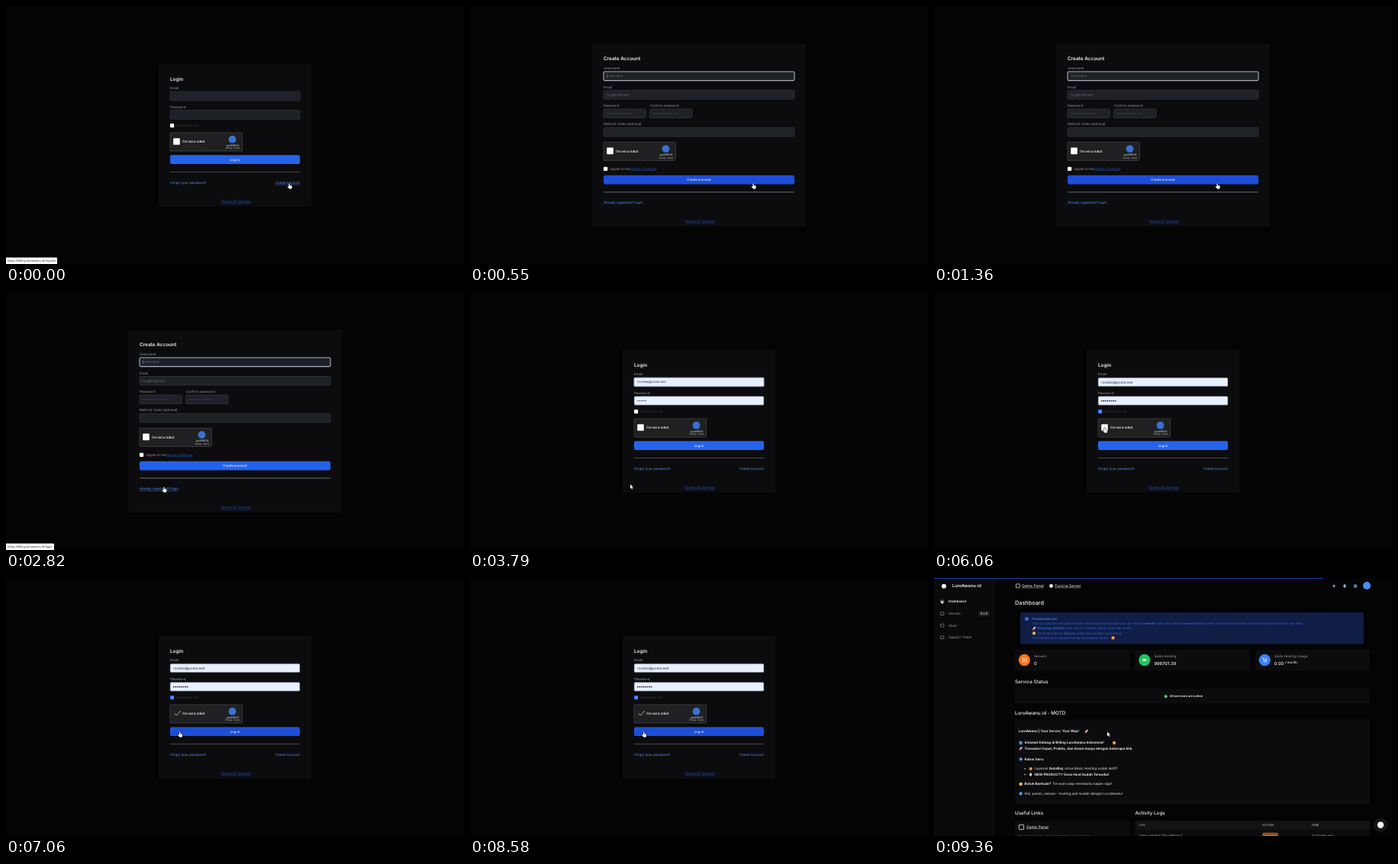
These frames come from a looping animation (600 px wide and 338 px high, 9390 ms). An HTML page with a canvas:

```html
<!DOCTYPE html>
<html lang="id">
<head>
<meta charset="utf-8">
<title>Login flow</title>
<style>
html, body { margin: 0; width: 100%; height: 100%; overflow: hidden; background: #040405; }
canvas { display: block; width: 600px; height: 338px; }
</style>
</head>
<body>
<canvas id="stage"></canvas>
<script>
const LOOP = 9390;
// Moments (ms) at which the page reacts
const AT = { register: 500, login: 3450, remember: 5000, verify: 6100, verified: 6550, dashboard: 8950 };
// Pointer stops: time, x, y
const STOPS = [
  [0, 370.5, 232.5], [1520, 370.5, 232.5], [2350, 206.3, 255.5], [3500, 206.3, 255.5],
  [3680, 210, 252], [3860, 210, 252], [4700, 217.3, 157.5], [5700, 217.3, 157.5],
  [6020, 223, 177.5], [6650, 223, 177.5], [7000, 227, 201.5], [LOOP, 227, 201.5]
];
const BRAND = 'LuroAwanu', CHAT = 'Tuvicra';
const BLUE = '#2563eb', HOVER = '#1d4ed8', LINK = '#5595f5', LABEL = '#9a9ca3', WHITE = '#f4f4f5';
const ARROW = new Path2D('M0 0V5.6L1.3 4.4L2.2 6.4L3.1 6L2.2 4.1H4Z');
const HAND = new Path2D('M0 .3Q.7-.5 1.2.3V2.6L3.5 3.1Q4.3 3.4 4.2 4.2L3.6 7H.6L-1.7 4.4Q-1.7 3.4-.8 3.7L0 4.3Z');

const canvas = document.getElementById('stage');
const c = canvas.getContext('2d');
const ratio = window.devicePixelRatio || 1;
canvas.width = 600 * ratio;
canvas.height = 338 * ratio;

let pointer = { x: 0, y: 0 }, hand = false;

const ease = p => { p = Math.max(0, Math.min(1, p)); return p * p * (3 - 2 * p); };

function pointerAt(t) {
  const i = STOPS.findIndex((s, k) => k && t <= s[0]);
  const [t0, x0, y0] = STOPS[i - 1], [t1, x1, y1] = STOPS[i];
  const p = ease((t - t0) / (t1 - t0));
  return { x: x0 + (x1 - x0) * p, y: y0 + (y1 - y0) * p };
}

function over(x, y, w, h) {
  const hit = pointer.x >= x && pointer.x <= x + w && pointer.y >= y && pointer.y <= y + h;
  if (hit) hand = true;
  return hit;
}

function box(x, y, w, h, fill, radius = 0, stroke, line = .6) {
  c.beginPath();
  c.roundRect(x, y, w, h, radius);
  if (fill) { c.fillStyle = fill; c.fill(); }
  if (stroke) { c.strokeStyle = stroke; c.lineWidth = line; c.stroke(); }
}

function dot(x, y, r, fill) {
  c.beginPath();
  c.arc(x, y, r, 0, 7);
  c.fillStyle = fill;
  c.fill();
}

function stroke(points, color, width) {
  c.beginPath();
  points.forEach(([x, y]) => c.lineTo(x, y));
  c.strokeStyle = color;
  c.lineWidth = width;
  c.stroke();
}

// Text between asterisks is bold
function text(str, x, y, size, color, { weight = 400, align = 'left', underline = false, family = 'Inter' } = {}) {
  const parts = str.split('*').map((s, i) => ({ s, font: `${i % 2 ? 700 : weight} ${size}px ${family}, sans-serif` }));
  for (const p of parts) { c.font = p.font; p.w = c.measureText(p.s).width; }
  const width = parts.reduce((sum, p) => sum + p.w, 0);
  let left = x - (align === 'center' ? width / 2 : align === 'right' ? width : 0);
  c.fillStyle = color;
  if (underline) c.fillRect(left, y + size * .46, width, .4);
  for (const p of parts) {
    c.font = p.font;
    c.fillText(p.s, left, y);
    left += p.w;
  }
}

function field(x, y, w, fill = '#1f2128', focused = false) {
  box(x, y, w, 11.6, fill, 1.5, focused ? '#a9b0be' : '#3a3d45', focused ? 1.1 : .6);
}

function caret(x, y, since) {
  if (since % 1000 < 500) box(x, y - 2.6, .5, 5.2, '#9ca3af');
}

function dots(x, y, count, step, r, color) {
  for (let i = 0; i < count; i++) dot(x + i * step, y, r, color);
}

function button(label, x, y, w) {
  box(x, y, w, 11.8, over(x, y, w, 11.8) ? HOVER : BLUE, 2);
  text(label, x + w / 2, y + 6.1, 4.3, WHITE, { weight: 500, align: 'center' });
}

function captcha(x, y, t) {
  box(x, y, 94.5, 24, '#202022', 1, '#47474a', .7);
  over(x + 4, y + 7, 9, 9);
  const cx = x + 8.5, cy = y + 11.5;
  if (t < AT.verify) box(x + 4.2, y + 7.2, 8.6, 8.6, '#fff', .8);
  else if (t < AT.verified) {
    const a = t / 110;
    c.beginPath();
    c.arc(cx, cy, 3.7, a, a + 4.4);
    c.strokeStyle = '#4a86e8';
    c.lineWidth = 1;
    c.stroke();
  } else stroke([[x + 6, y + 11.5], [x + 8.4, y + 14], [x + 13.6, y + 8]], '#c3cbc8', .9);
  text("I'm not a robot", x + 16.3, y + 11.8, 4.5, WHITE, { weight: 500, family: 'Roboto' });
  dot(x + 81.5, y + 8.7, 4.9, '#3c6fd6');
  text('goVERIFIO', x + 82, y + 17, 3.5, '#ddd', { align: 'center', family: 'Roboto' });
  text('Privacy - Terms', x + 82, y + 20.6, 2.7, '#ddd', { align: 'center', family: 'Roboto' });
}

function terms(y) {
  text('Terms of Service', 301, y, 4.9, '#1f55cf', { align: 'center', underline: true });
}

function statusBar(path, w) {
  box(0, 329.6, w, 8.4, '#fff', [0, 1, 0, 0]);
  text(`https://billing.${BRAND.toLowerCase()}.id/${path}`, 2, 334.2, 4.05, '#3c4043', { family: 'Roboto' });
}

function loginPage(t) {
  const filled = t >= AT.login, touched = t >= AT.remember;
  const focused = filled && !touched;
  const fill = filled ? '#e8f0fe' : undefined;
  box(200, 76, 200, 187, '#0c0c0e', 1);
  text('Login', 215, 95.8, 6.4, WHITE, { weight: 600 });
  text('Email', 215, 108, 4.4, LABEL);
  field(215, 112.2, 170, fill, focused);
  text('Password', 215, 132.4, 4.4, LABEL);
  field(215, 136.6, 170, fill);
  if (filled) {
    text('rovelka@posta.test', 219, 118.2, touched ? 4.6 : 4.2, '#30343c');
    dots(219.8, 142.6, 8, touched ? 2.55 : 1.55, touched ? .95 : .55, '#22252b');
  }
  if (focused) caret(219, 118, t - AT.login);

  box(215, 154, 5.2, 5.2, touched ? '#2f6fe8' : '#fff', 1);
  if (touched) stroke([[216.2, 156.7], [217.2, 157.7], [219.1, 155.4]], '#fff', .7);
  text('Remember me', 222.8, 156.7, 4.4, '#3a3b40');
  captcha(215, 166, t);
  button('Log in', 215, 195.3, 170);
  box(215, 217, 170, .6, '#858081');
  text('Forgot your password?', 215, 231.8, 4.4, LINK);
  const register = !filled && over(352, 228, 33, 8);
  text('Create Account', 385, 231.8, 4.4, LINK, { align: 'right', underline: register });
  terms(256.5);
  if (register) statusBar('register', 67);
}

function registerPage(t) {
  box(160, 49.5, 280, 239.5, '#0c0c0e', 1);
  text('Create Account', 175, 69.2, 6.4, WHITE, { weight: 600 });
  const labels = [['Username', 175, 81.7, 250], ['Email', 175, 106.2, 250], ['Password', 175, 130.6, 55.5],
    ['Confirm password', 235.6, 130.6, 55.5], ['Referral Code (optional)', 175, 155, 250]];
  labels.forEach(([label, x, y, w], i) => {
    text(label, x, y, 4.4, LABEL);
    field(x, y + 4.3, w, undefined, i === 0);
  });
  text('Username', 179, 92, 4.4, '#636873');
  text('foo@mail.test', 179, 116.3, 4.5, '#636873');
  dots(179.8, 140.8, 14, 2.45, .6, '#575b65');
  dots(240.4, 140.8, 14, 2.35, .6, '#575b65');
  caret(179, 91.8, t - AT.register);
  captcha(175, 178.4, 0);
  box(175, 210.8, 5.2, 5.2, '#fff', 1);
  text('I agree to the', 182.4, 213.6, 4.4, LABEL);
  text('Terms of Service', 210, 213.6, 4.3, '#2459d2', { underline: true });
  button('Create account', 175, 221.8, 250);
  box(175, 243.6, 250, .6, '#86868a');
  const login = over(175, 254, 52, 8);
  text('Already registered? login', 175, 258, 4.35, LINK, { underline: login });
  terms(282.6);
  if (login) statusBar('login', 63);
}

function emoji(x, y, main, detail) {
  dot(x, y, 2.2, main);
  dot(x + .6, y - .5, 1, detail);
}

function rocket(x, y) {
  c.save();
  c.translate(x, y);
  c.rotate(.75);
  box(-1, -2.8, 2, 4.6, '#cfd8e3', 1);
  box(-1.7, .6, 3.4, 1.2, '#d64545', .5);
  box(-.5, 1.8, 1, 1, '#f5a623', .4);
  c.restore();
}

function sidebar() {
  box(0, 0, 80, 338, '#0a0a0b');
  dot(13, 10.8, 3, WHITE);
  text(BRAND + '.id', 24, 10.7, 5.7, WHITE, { weight: 600 });
  const items = ['Dashboard', 'Servers', 'Store', 'Support Ticket'];
  items.forEach((item, i) => {
    const y = 31 + i * 15.6, color = i ? '#a1a1aa' : WHITE;
    text(item, 19, y, 4.35, color, { weight: i ? 400 : 600 });
    if (i) box(8.5, y - 1.9, 4.4, 3.8, null, .6, color, .6);
    else { stroke([[8, y], [10.7, y - 2.4], [13.4, y]], color, .7); box(9, y - .4, 3.4, 2.6, color); }
  });
  box(58, 43, 15, 7, '#1d1d21', 1.5);
  text('0 / 4', 65.5, 46.6, 4, WHITE, { weight: 600, align: 'center' });
}

function topBar() {
  box(107.5, 7.9, 4.8, 4.8, null, .4, WHITE, .7);
  text('Game Panel', 115, 10.4, 5.1, WHITE, { underline: true });
  dot(153.5, 10.4, 2.4, WHITE);
  text(CHAT + ' Server', 158, 10.4, 5, WHITE, { underline: true });
  dot(524, 10.5, 1.3, '#93b4e8');
  for (let i = 0; i < 8; i++) dot(524 + 2.2 * Math.cos(i * Math.PI / 4), 10.5 + 2.2 * Math.sin(i * Math.PI / 4), .35, '#93b4e8');
  box(536.4, 8.3, 3.2, 3.7, '#93b4e8', [1.6, 1.6, 0, 0]);
  dot(538, 12.6, .7, '#93b4e8');
  dot(552, 10.6, 2.4, '#7f9dd0');
  stroke([[549.6, 10.6], [554.4, 10.6]], '#0a0a0b', .4);
  stroke([[552, 8.2], [552, 13]], '#0a0a0b', .4);
  dot(567, 10, 5, '#4c8ff5');
}

function notice() {
  const color = '#2f62d2';
  box(113, 45, 450, 41.5, '#101d45', 2);
  dot(121.5, 53.6, 2.3, '#3b82f6');
  text('i', 121.5, 53.7, 3.6, '#101d45', { weight: 700, align: 'center' });
  text('Pemberitahuan!', 128.5, 53.7, 4.3, '#3b82f6', { weight: 600 });
  text(`Top-up saldo kini semakin mudah! Anda dapat melakukan top-up melalui *website* kami atau melalui *server ${CHAT}* resmi. Nikmati kemudahan proses dan layanan terbaik dari kami.`, 128.5, 60, 4.2, color);
  rocket(131, 66.2);
  text('*Kunjungi website* kami untuk transaksi yang cepat dan aman.', 135, 66.2, 4.25, color);
  emoji(131, 72.4, '#d7a04a', '#f1cf7b');
  text(`Tetap tersedia di *${CHAT}* untuk kemudahan komunikasi.`, 135, 72.4, 4.25, color);
  text('Terimakasih atas pengertian dan kesabaran Anda.', 128.5, 78.6, 4.25, color);
  emoji(234.5, 78.5, '#e0913a', '#f6c453');
}

function stats() {
  const cards = [['Servers', '0', '#f97316'], ['Saldo Hosting', '998701.39', '#22c55e'], ['Saldo Hosting Usage', '0.00', '#3b82f6']];
  cards.forEach(([label, value, color], i) => {
    const x = 106 + i * 157.4;
    box(x, 94, 150.4, 27.6, '#0c0c0e', 1.5);
    dot(x + 12.4, 107.5, 7.7, color);
    text(label, x + 25, 102.2, 4.4, '#a1a1aa');
    text(value, x + 25, 112.2, 5.7, WHITE, { weight: 500 });
  });
  box(115.8, 104.7, 5.4, 2.4, null, .5, '#fff', .6);
  box(115.8, 107.9, 5.4, 2.4, null, .5, '#fff', .6);
  box(273.2, 106.1, 5, 2.6, '#fff', 1);
  stroke([[430, 105.2], [431.2, 105.2], [432, 108.6], [435.4, 108.6], [436, 106], [431.5, 106]], '#fff', .7);
  dot(432.5, 110, .6, '#fff');
  dot(435, 110, .6, '#fff');
  text('/ month', 460, 110.6, 4.3, WHITE, { weight: 500 });
}

function motd() {
  box(106, 185.5, 465, 110.5, '#0c0c0e', 1.5);
  const line = (str, x, y) => text(str, x, y, 4.5, '#e6e6e9');
  line(`*${BRAND} | Your Server, Your Way!*`, 111, 201);
  rocket(199.5, 201);
  box(111.6, 213.8, 4, 4.4, '#4f8fd8', .6);
  line(`*Selamat Datang di Billing ${BRAND} Indonesia!*`, 118.5, 216);
  emoji(236, 216, '#e0913a', '#f6c453');
  rocket(113.6, 223.5);
  line('*Transaksi Cepat, Praktis, dan Aman hanya dengan beberapa klik.*', 118.5, 223.5);
  emoji(113.6, 237.5, '#4b6fae', '#c9d6ec');
  line('*Kabar Seru:*', 118.5, 237.5);
  dot(119.2, 250, .8, WHITE);
  emoji(126.6, 250, '#f0642f', '#ffc23d');
  line('Layanan *AutoBuy* untuk Basic Hosting sudah aktif!!', 131.5, 250);
  dot(119.2, 257.5, .8, WHITE);
  box(125.2, 255.4, 2.8, 4.2, '#d9d3c4', 1);
  line('*NEW PRODUCT!! Vuno Host Sudah Tersedia!*', 131.5, 257.5);
  emoji(113.6, 270, '#e8a93c', '#ffe08a');
  line('*Butuh Bantuan?* Tim kami siap membantu kapan saja!', 118.5, 270);
  emoji(113.6, 282.5, '#3d8fd6', '#7cc4f0');
  line(`Klik, pesan, selesai - hosting jadi mudah dengan ${BRAND}!`, 118.5, 282.5);
}

function footerCards() {
  box(106, 318, 150.4, 30, '#0c0c0e', 1.5);
  box(111.4, 323.2, 6.2, 6.2, null, .5, WHITE, .8);
  text('Game Panel', 121, 326.2, 5.1, WHITE, { underline: true });
  text('Gunakan panel untuk mengelola server Anda', 111, 338.2, 4.4, '#a1a1aa');
  box(263.5, 318, 307.5, 30, '#0c0c0e', 1.5);
  box(263.5, 318, 307.5, 12, '#131316', [1.5, 1.5, 0, 0]);
  [['LOG', 268.5], ['ACTION', 430], ['TIME', 494.5]].forEach(([s, x]) =>
    text(s, x, 323.7, 3.9, '#9a9aa2', { weight: 600 }));
  text('User updated "RuvaMilano"', 268.5, 338, 4.4, '#b4b4bb');
  box(430, 333.5, 21, 8, '#8a4b20', 2);
  text('Updated', 440.5, 337.7, 4, '#f0c19c', { align: 'center' });
  text('7 minutes ago', 494.5, 338, 4.4, '#b4b4bb');
  dot(585, 323.5, 9, '#151619');
  dot(585, 323.5, 4.2, WHITE);
}

function dashboard(t) {
  sidebar();
  topBar();
  box(0, 0, 510 * ease((t - AT.dashboard) / 350), .8, HOVER);
  text('Dashboard', 106, 33, 7.3, WHITE, { weight: 500 });
  notice();
  stats();
  const heading = (str, x, y) => text(str, x, y, 6.3, WHITE, { weight: 500 });
  heading('Service Status', 106, 136);
  box(106, 145, 465, 19.6, '#0c0c0e', 1.5);
  dot(303.7, 155, 2.6, '#14532d');
  dot(303.7, 155, 1.6, '#86d9a4');
  text('All services are online', 308.7, 155.1, 4.1, WHITE, { weight: 600 });
  heading(`${BRAND}.id - MOTD`, 106, 177);
  motd();
  heading('Useful Links', 106, 308);
  heading('Activity Logs', 263.5, 308);
  footerCards();
}

function drawPointer() {
  const shape = hand ? HAND : ARROW;
  c.save();
  c.translate(pointer.x, pointer.y);
  c.lineJoin = 'round';
  c.strokeStyle = '#111';
  c.lineWidth = .9;
  c.stroke(shape);
  c.fillStyle = '#fff';
  c.fill(shape);
  c.restore();
}

function draw(t) {
  c.setTransform(ratio, 0, 0, ratio, 0, 0);
  c.textBaseline = 'middle';
  c.textRendering = 'geometricPrecision';
  box(0, 0, 600, 338, '#040405');
  pointer = pointerAt(t);
  hand = false;
  if (t >= AT.dashboard) dashboard(t);
  else if (t >= AT.register && t < AT.login) registerPage(t);
  else loginPage(t);
  drawPointer();
}

const start = performance.now();
function frame() {
  draw((performance.now() - start) % LOOP);
  requestAnimationFrame(frame);
}
frame();
</script>
</body>
</html>
```
